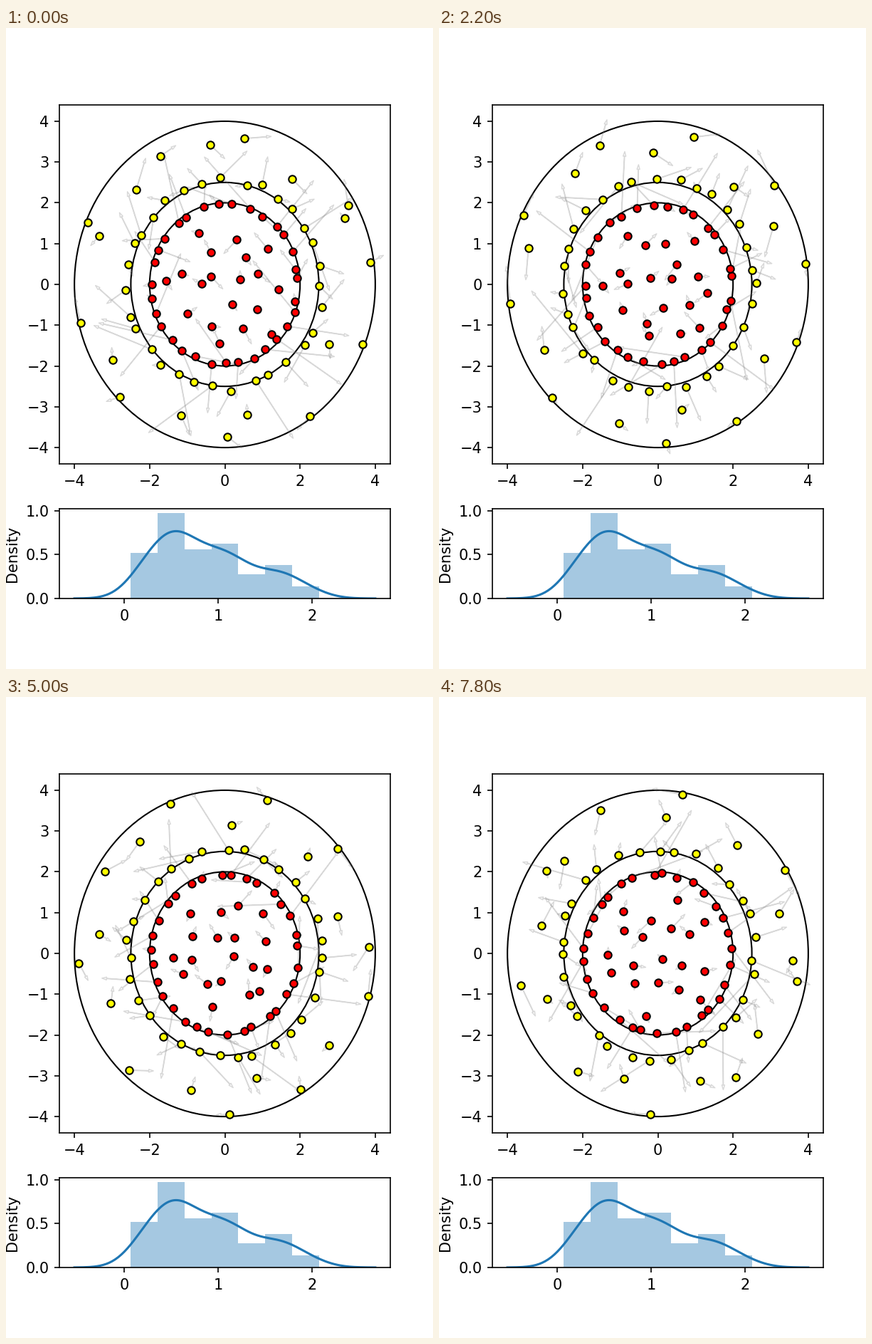
A matplotlib script for the animation above (8000 ms loop, 600 by 900 pixels).

```python
import math
import numpy as np
import matplotlib.pyplot as plt
from matplotlib.animation import FuncAnimation

FRAMES = 40
STEP_MS = 200
DT = 0.05                   # simulated time per frame
WALLED, FREE = 31, 19       # dots of each colour at the wall and off it
COUNTS = [15, 28, 16, 18, 8, 11, 4]

rng = np.random.default_rng(12)
time = np.arange(FRAMES)[:, None]

# One hundred speeds, spread inside the histogram's bins.
edges = np.linspace(0.067, 2.0765, len(COUNTS) + 1)
width = edges[1] - edges[0]
speeds = np.concatenate([
    lo + width * ((np.arange(n) + 0.5) / n) ** 0.7
    for n, lo in zip(COUNTS, edges)])


def sway(n, size, slow=0.05, fast=0.13):
    """A slow swing per dot, each with its own rate and phase."""
    phase = rng.uniform(0, math.tau, n)
    rate = rng.uniform(slow, fast, n)
    return size * np.sin(phase + rate * time)


def polar(r, angle):
    return np.stack([r * np.cos(angle), r * np.sin(angle)], axis=-1)


def spread(n, start, jitter):
    """Nearly even angles around the circle."""
    return (math.radians(start) + math.tau * np.arange(n) / n
            + np.radians(rng.uniform(-jitter, jitter, n)))


def collide(outward):
    """Velocities that stay until a dot is hit, then swap speeds."""
    n = outward.shape[1]
    turn = rng.normal(0, 1.3, n)
    speed = rng.choice(speeds, n, replace=False)
    vel = []
    for base in outward:
        hit = np.flatnonzero(rng.random(n) < 0.25)
        turn[hit] = rng.normal(0, 1.3, len(hit))
        speed[hit] = speed[rng.permutation(hit)]
        vel.append(polar(speed, base + turn))
    return np.array(vel)


def wall_dots(radius, wobble, start):
    angle = spread(WALLED, start, 1.5) + sway(WALLED, math.radians(2.5))
    r = radius + sway(WALLED, wobble, 0.15, 0.4)
    return polar(r, angle), collide(angle)


def inner_dots():
    """Sunflower layout, every dot wandering around its seat."""
    i = np.arange(FREE)
    seat = polar(1.55 * np.sqrt((i + 0.5) / FREE),
                 i * math.pi * (3 - math.sqrt(5)))
    drift = np.stack([sway(FREE, 0.16), sway(FREE, 0.16)], axis=-1)
    pos = seat + drift
    return pos, np.gradient(pos, axis=0) / DT


def outer_dots():
    angle = spread(FREE, 0, 5) + sway(FREE, math.radians(6))
    seat = np.where(np.arange(FREE) % 2, 3.35, 3.8)
    r = np.minimum(seat + sway(FREE, 0.22), 3.95)
    pos = polar(r, angle)
    return pos, np.gradient(pos, axis=0) / DT


def join(*groups):
    return [np.concatenate(g, axis=1) for g in zip(*groups)]


red, red_vel = join(inner_dots(), wall_dots(1.95, 0.035, 3))
yellow, yellow_vel = join(outer_dots(), wall_dots(2.57, 0.07, -2))
spots, vels = join((red, red_vel), (yellow, yellow_vel))

fig, (ax, low) = plt.subplots(2, 1, figsize=(4, 6), dpi=150,
                              gridspec_kw={'height_ratios': [4, 1]})

ax.set(xlim=(-4.4, 4.4), ylim=(-4.4, 4.4),
       xticks=range(-4, 5, 2), yticks=range(-4, 5))
for radius in (2, 2.5, 4):
    ax.add_patch(plt.Circle((0, 0), radius, fill=False, lw=1))

arrows = ax.quiver(*spots[0].T, *vels[0].T, angles='xy', scale_units='xy',
                   scale=1, units='dots', width=0.5, headwidth=8,
                   headlength=13, headaxislength=13, minlength=0,
                   facecolor='none', edgecolor=(0.5, 0.5, 0.5, 0.3),
                   linewidth=0.7, zorder=1)


def dots(color):
    return ax.plot([], [], 'o', ms=5, mfc=color, mec='black', mew=1,
                   zorder=3)[0]


red_dots, yellow_dots = dots('red'), dots('yellow')

# Speed histogram with its smoothed density.
heights = np.array(COUNTS) / (len(speeds) * width)
low.bar(edges[:-1], heights, width, align='edge', color='C0', alpha=0.4,
        linewidth=0)
grid = np.linspace(-0.53, 2.673, 200)
bw = 0.2
bell = np.exp(-0.5 * ((grid[:, None] - speeds) / bw) ** 2)
low.plot(grid, bell.mean(axis=1) / (bw * math.sqrt(math.tau)), color='C0')
low.set(xlim=(-0.69, 2.833), ylim=(0, 1.05 * heights.max()),
        xticks=(0, 1, 2), yticks=(0, 0.5, 1), ylabel='Density')


def draw(frame):
    red_dots.set_data(*red[frame].T)
    yellow_dots.set_data(*yellow[frame].T)
    arrows.set_offsets(spots[frame])
    arrows.set_UVC(*vels[frame].T)
    return arrows, red_dots, yellow_dots


anim = FuncAnimation(fig, draw, frames=FRAMES, interval=STEP_MS,
                     repeat=True, repeat_delay=0)
plt.show()
```
